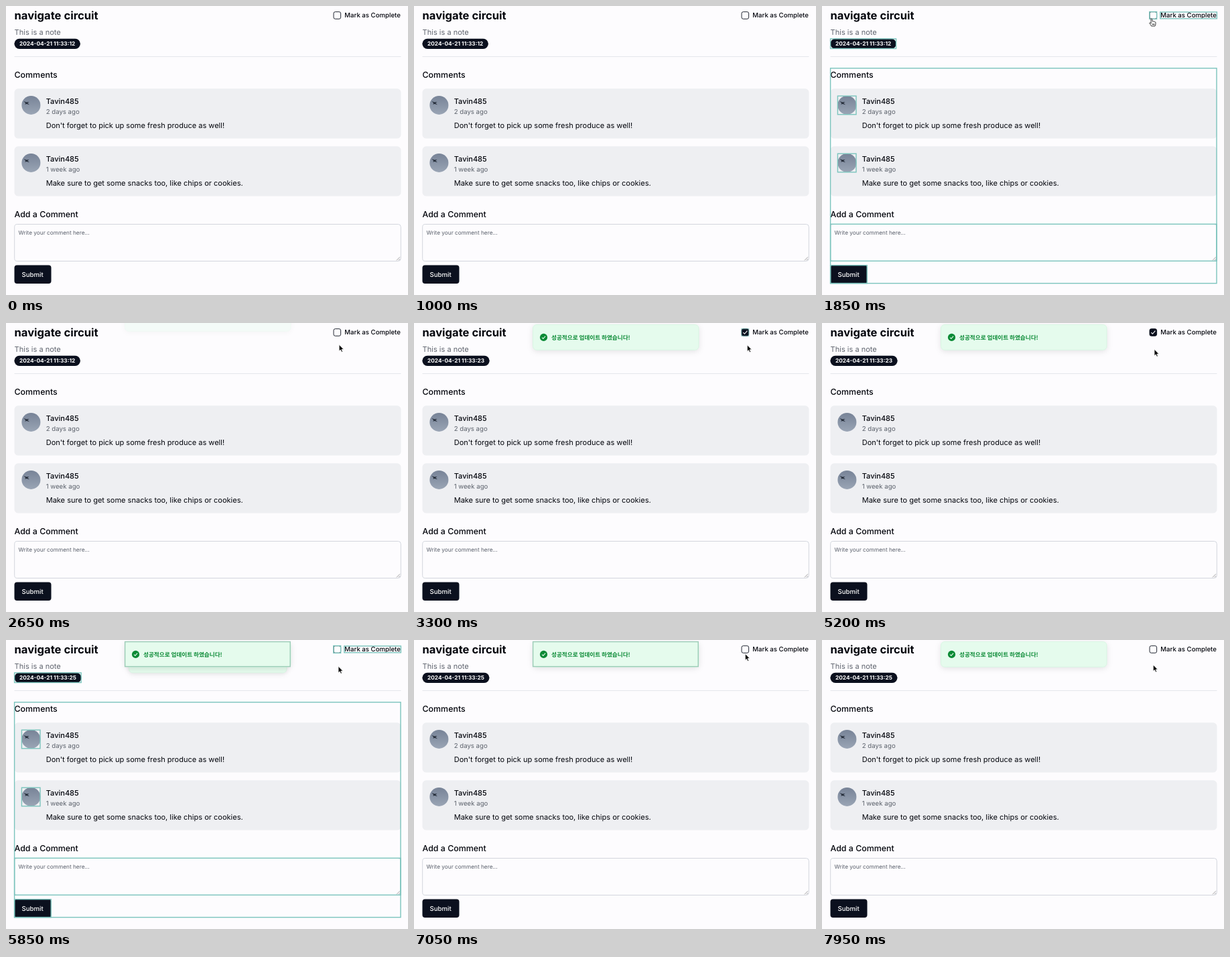
These frames come from a looping animation (600x431 px, 8 s). An HTML page:

```html
<!DOCTYPE html>
<html lang="en">
<head>
<meta charset="utf-8">
<title>Note with comments</title>
<style>
  html, body { margin: 0; width: 100%; height: 100%; overflow: hidden; background: #fdfcfe; }
  svg { display: block; width: 100%; height: 100%; }
  text {
    font: 400 11.03px Inter, sans-serif; fill: #04060d;
    font-optical-sizing: none; text-rendering: geometricPrecision;
  }
  .title { font-size: 16.58px; font-weight: 700; }
  .heading { font-size: 12.42px; font-weight: 500; }
  .name { font-weight: 500; }
  .muted { fill: #60656f; }
  .ago { font-size: 9.65px; fill: #5c626c; }
  .label { font-size: 9.65px; font-weight: 500; }
  .badge { font-size: 8.3px; font-weight: 700; fill: #fff; }
  .hint { font-size: 8.27px; fill: #5a606b; }
  .light { fill: #fff; }
  .toast text { font: 700 8.6px "Noto Sans CJK KR", "Noto Sans CJK", sans-serif; fill: #0a8a35; }
  .toast > rect { fill: #e5fbed; stroke: #d2f5df; stroke-width: .7; filter: drop-shadow(0 2.7px 4px rgba(0, 0, 0, .1)); }
  .outline { fill: none; stroke: #7bc4bd; stroke-width: 1.4; }
  .warm { stroke: #9bccb6; }
</style>
</head>
<body>
<svg id="stage" viewBox="0 0 600 431" preserveAspectRatio="none"></svg>
<script>
const LOOP = 8000;
const INK = '#0b101e';
const stage = document.getElementById('stage');

const text = (x, y, cls, str, id = '') => `<text x="${x}" y="${y}" class="${cls}" id="${id}">${str}</text>`;
const box = (x, y, w, h, r, attrs) => `<rect x="${x}" y="${y}" width="${w}" height="${h}" rx="${r}" ${attrs}/>`;
const outline = (x, y, w, h, attrs = '') => box(x, y, w, h, 0, `class="outline" ${attrs}`);

const comment = (y, ago, body) => `<g transform="translate(0 ${y})">
  ${box(12.5, 0, 577, 74.3, 5.5, 'fill="#eeeff2"')}
  <circle cx="37.4" cy="24.6" r="14" fill="url(#sky)"/>
  <path d="M26.4 18.6l4 1.6 4.2-.6-2.4 1.8 2.8 2.6-4.2-1.4-2.4.8.8-2z" fill="#252d3a"/>
  ${text(59.7, 23, 'name', 'Tavin485')}
  ${text(59.7, 37.7, 'ago', ago)}
  ${text(59.7, 59, '', body)}</g>`;

const toast = id => `<g class="toast" id="${id}">
  ${box(177.5, 2.5, 247.5, 37.7, 5.5, '')}
  <g class="content">
    <circle cx="193.5" cy="21.4" r="5.6" fill="#0a8a35"/>
    <path d="M191 21.6l1.8 1.8 3.3-3.8" fill="none" stroke="#e5fbed" stroke-width="1.1"/>
    ${text(205, 24.6, '', '성공적으로 업데이트 하였습니다!')}
  </g></g>`;

stage.innerHTML = `
  <defs><linearGradient id="sky" x2="0" y2="1">
    <stop stop-color="#778397"/><stop offset="1" stop-color="#9aa5b5"/>
  </linearGradient></defs>
  ${text(12.5, 19.7, 'title', 'navigate circuit')}
  ${text(12.6, 42.8, 'muted', 'This is a note')}
  ${box(12.4, 48.7, 99, 15.2, 7.6, `id="pill" fill="${INK}"`)}
  ${text(20, 59.4, 'badge', '', 'date')}
  <path d="M12.5 75.5H589.5" stroke="#e2e4e9" stroke-width=".9"/>
  ${box(489, 8.7, 10.6, 10.6, 2.4, `id="check" stroke="${INK}" stroke-width=".9"`)}
  <path id="tick" d="M491.4 14.2l2 2.1 4-4.6" fill="none" stroke="#fff" stroke-width="1.1"/>
  ${text(505.3, 17.4, 'label', 'Mark as Complete')}
  ${text(12.5, 106.8, 'heading', 'Comments')}
  ${comment(123.3, '2 days ago', "Don't forget to pick up some fresh produce as well!")}
  ${comment(209.3, '1 week ago', 'Make sure to get some snacks too, like chips or cookies.')}
  ${text(12.5, 314.7, 'heading', 'Add a Comment')}
  ${box(12.7, 325.5, 576.6, 55, 4, 'fill="#fdfcfe" stroke="#cfd3da" stroke-width=".9"')}
  <path d="M583 379.3l5-5M586 379.3l2-2" stroke="#777" stroke-width=".7"/>
  ${text(18.5, 341.3, 'hint', 'Write your comment here...')}
  ${box(12.5, 386.6, 55, 27.4, 4, `fill="${INK}"`)}
  ${text(23.5, 403.6, 'label light', 'Submit')}
  ${toast('first')}${toast('second')}
  <g id="flash">
    ${outline(12.6, 48.9, 98.6, 14.6, 'id="pillOutline"')}
    ${outline(504.8, 9, 84.6, 9.8)}
    ${outline(12.6, 92.8, 576.4, 320.8)}
    ${outline(23.4, 134.2, 27.6, 27.6)}
    ${outline(23.4, 220.2, 27.6, 27.6)}
    ${outline(12.6, 325.3, 576.4, 55)}
    ${outline(12.6, 386.7, 54.6, 26.9)}
  </g>
  ${outline(488.8, 8.6, 10.8, 10.8, 'id="checkOutline"')}
  ${box(177.6, 2.6, 246.6, 37, 0, 'class="outline warm" id="toastOutline"')}
  <g id="cursor" stroke-linejoin="round">
    <path id="arrow" d="M0 0V9.6L2.2 7.6 3.7 11 5.4 10.3 3.9 7H6.9Z" fill="#000" stroke="#fff" stroke-width=".8"/>
    <path id="hand" d="M-.9 .4Q0-.7.9.4L1.3 4 2.4 3.7 3.2 4.3 4.3 4.1 5 4.8 6.2 5.2V8.2L5.2 11H-.2L-1.4 8.8-3 6.6Q-2.8 5.4-1.6 6.1L-.6 7Z
      M1.4 7.4V9.4M2.8 7.4V9.4M4.2 7.4V9.4" fill="#fff" stroke="#111" stroke-width=".8"/>
  </g>`;

const $ = id => document.getElementById(id);
const show = (id, on) => $(id).setAttribute('visibility', on ? 'visible' : 'hidden');
const within = (t, spans) => spans.some(([from, to]) => t >= from && t < to);
const progress = (t, start, length) => Math.min(1, Math.max(0, (t - start) / length));
const easeOut = p => 1 - (1 - p) ** 3;

const CHECKED = 3000, UNCHECKED = 5600;
const FIRST_IN = 2600, SECOND_IN = 5430, FIRST_OUT = 6600;
const FLASHES = [[1700, 2000], [CHECKED, 3250], [4550, 4850], [UNCHECKED, 5950], [7450, 7750]];
const TOAST_FLASHES = [[UNCHECKED, 5950], [6850, 7150]];

// time, x, y of the pointer tip
const POINTER = [
  [1150, 562, 300], [1650, 491.8, 19], [2250, 491.8, 19], [2700, 497.3, 32.8],
  [3700, 497.3, 32.8], [4200, 493, 18], [4800, 493, 18], [5100, 496, 39.3],
  [6600, 496, 39.3], [7050, 494.3, 20.6], [7200, 493.5, 18], [7550, 493.5, 18],
  [7850, 494.3, 37], [LOOP, 494.3, 37]
];

function pointerAt(t) {
  const i = Math.max(1, POINTER.findIndex(k => k[0] > t));
  const [a, b] = [POINTER[i - 1], POINTER[i]];
  const p = progress(t, a[0], b[0] - a[0]);
  const s = p * p * (3 - 2 * p);
  return [a[1] + (b[1] - a[1]) * s, a[2] + (b[2] - a[2]) * s];
}

function setDate(seconds) {
  const value = `2024-04-21 11:33:${seconds}`;
  if ($('date').textContent === value) return;
  $('date').textContent = value;
  const width = $('date').getComputedTextLength() + 15.2;
  $('pill').setAttribute('width', width);
  $('pillOutline').setAttribute('width', width - .5);
}

// Slides in from above; "back" moves the toast behind a newer one.
function placeToast(id, enter, back, leave) {
  const scale = 1 - .05 * back;
  const y = 21.4 - 42 * (1 - enter) + 9.6 * back;
  $(id).setAttribute('transform', `translate(301.2 ${y}) scale(${scale}) translate(-301.2 -21.4)`);
  $(id).setAttribute('opacity', enter * (1 - leave));
  $(id).querySelector('.content').setAttribute('opacity', 1 - back);
}

function render(t) {
  const checked = t >= CHECKED && t < UNCHECKED;
  setDate(t < CHECKED ? 12 : checked ? 23 : 25);
  $('check').setAttribute('fill', checked ? INK : '#fdfcfe');
  show('tick', checked);

  placeToast('first', easeOut(progress(t, FIRST_IN, 400)),
    easeOut(progress(t, SECOND_IN, 400)), progress(t, FIRST_OUT, 200));
  placeToast('second', easeOut(progress(t, SECOND_IN, 400)), 0, 0);

  const flash = within(t, FLASHES);
  show('flash', flash);
  show('checkOutline', flash || within(t, [[CHECKED, 3350]]));
  $('checkOutline').setAttribute('opacity', flash ? 1 : .55);
  show('toastOutline', within(t, TOAST_FLASHES));

  const [x, y] = pointerAt(t);
  const visible = t >= POINTER[0][0];
  $('cursor').setAttribute('transform', `translate(${x} ${y})`);
  show('arrow', visible && y >= 19.8);
  show('hand', visible && y < 19.8);
}

function tick() {
  render(performance.now() % LOOP);
  requestAnimationFrame(tick);
}
tick();
</script>
</body>
</html>
```
